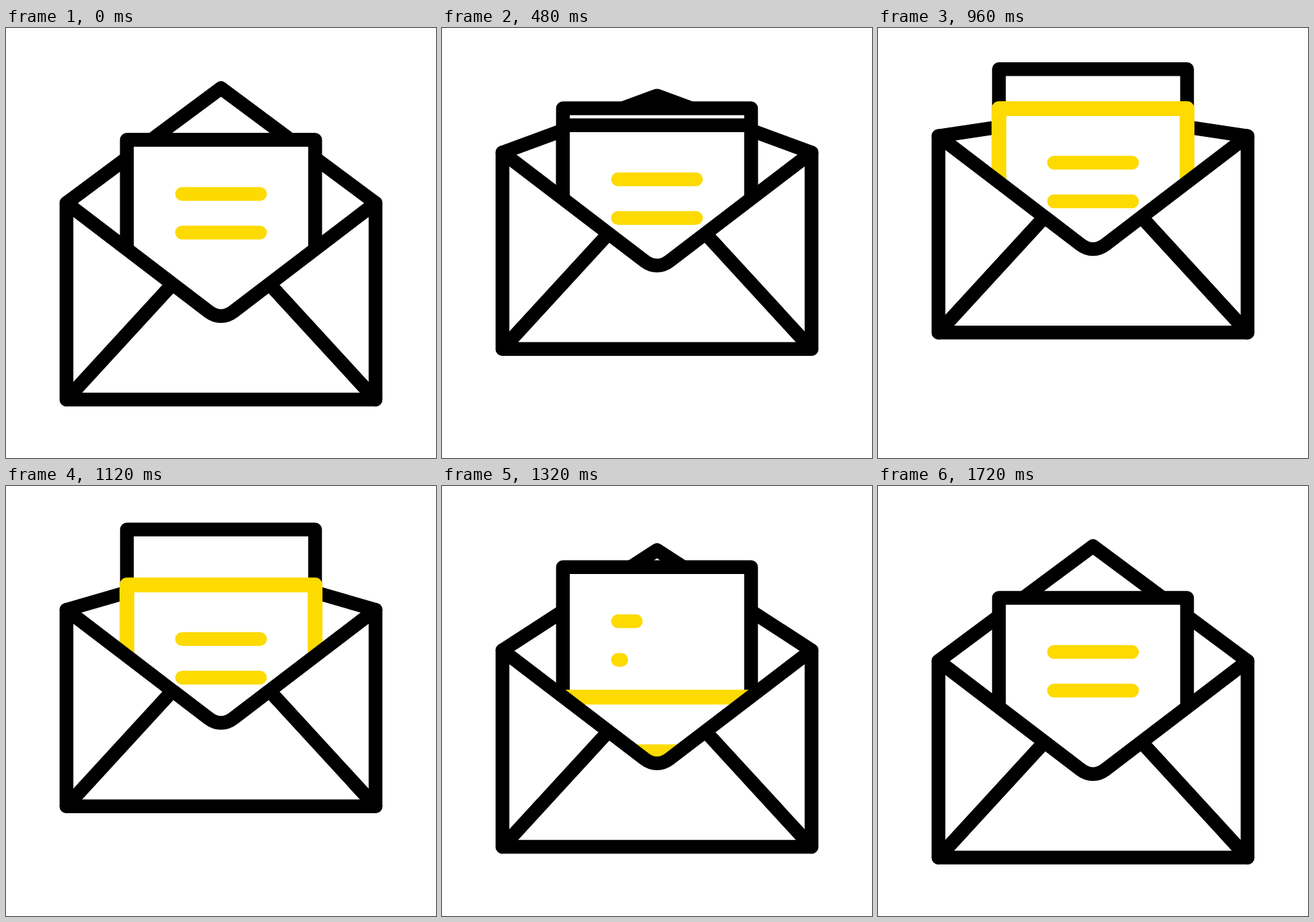
Recreate the animation shown at these times as an HTML page. Size 640 by 640 pixels, loop 2 s.

```html
<!DOCTYPE html>
<html lang="en">
<head>
<meta charset="utf-8">
<title>Open envelope</title>
<style>
  html, body { margin: 0; width: 100%; height: 100%; overflow: hidden; background: #fff; }
  svg { display: block; width: 100vw; height: 100vh; }
  path { fill: none; stroke: #000; stroke-width: 20.5; stroke-linecap: round; stroke-linejoin: round; }
  .white { fill: #fff; }
  .yellow { stroke: #fdda00; }
</style>
</head>
<body>
<svg viewBox="0 0 640 640">
  <clipPath id="above"><rect id="clip" width="640" height="553"/></clipPath>
  <path id="flap"/>
  <g clip-path="url(#above)">
    <g id="back">
      <path class="white" d="M180 406V166.5H460V406"/>
      <path class="yellow" id="line1"/>
      <path class="yellow" id="line2"/>
    </g>
    <g id="letter">
      <path class="white" d="M180 406V166.5H460V406"/>
      <path class="yellow" id="trim" d="M180 406V166.5H460V406" pathLength="760" stroke-width="22" style="stroke-width:22"/>
      <path class="yellow" d="M262 247H378M262 304.5H378"/>
    </g>
  </g>
  <g id="front">
    <path class="white" d="M90 260.5L301.5 422C313.2 430.9 326.8 430.9 338.5 422L550 260.5V553H90Z"/>
    <path d="M90 553L247 382M550 553L393 382"/>
  </g>
</svg>
<script>
const LOOP = 2000, STEP = 40;
const $ = id => document.getElementById(id);

// Eased progress between two times; the curve is cubic-bezier(p, 0, q, 1).
function ease(t, from, to, p = 0.75, q = 1 - p) {
  const x = (t - from) / (to - from);
  if (x <= 0) return 0;
  if (x >= 1) return 1;
  let lo = 0, hi = 1, u = 0.5;
  for (let i = 0; i < 24; i++) {
    u = (lo + hi) / 2;
    const v = 1 - u;
    if (3 * u * v * v * p + 3 * u * u * v * q + u * u * u < x) lo = u;
    else hi = u;
  }
  return u * u * (3 - 2 * u);
}

const shift = (id, y) => $(id).setAttribute('transform', `translate(0 ${y.toFixed(3)})`);
const show = (id, on) => $(id).setAttribute('visibility', on ? 'visible' : 'hidden');

function growLine(id, y, k) {
  show(id, k > 0);
  $(id).setAttribute('d', `M262 ${y}H${262.01 + 116 * k}`);
}

function draw(t) {
  const back = ease(t, 900, 1640, 0.51, 0.18);
  const env = -100.7 * (ease(t, 103, 805, 0.67, 0.2) - back);
  const rise = 171 - 138 * (ease(t, 120, 795) - back);
  const corner = 260.5 + env;

  $('flap').setAttribute('d', `M90 ${corner}L320 ${corner - rise}L550 ${corner}`);
  $('clip').setAttribute('height', 553 + env);
  shift('front', env);
  shift('back', -105.3 * (ease(t, 120, 860) - ease(t, 988, 1631)));
  shift('letter', -48.8 * ease(t, 120, 860) + 340 * ease(t, 880, 1720, 0.7));

  const trim = ease(t, 395, 933, 0.5);
  show('trim', trim > 0);
  $('trim').setAttribute('stroke-dasharray', `${760 * trim} 1600`);

  growLine('line1', 247, ease(t, 1159, 1619, 0.5));
  growLine('line2', 304.5, ease(t, 1246, 1706, 0.5));
}

const start = performance.now();
function tick() {
  const t = (performance.now() - start) % LOOP;
  draw(Math.floor(t / STEP) * STEP);
  requestAnimationFrame(tick);
}
tick();
</script>
</body>
</html>
```
